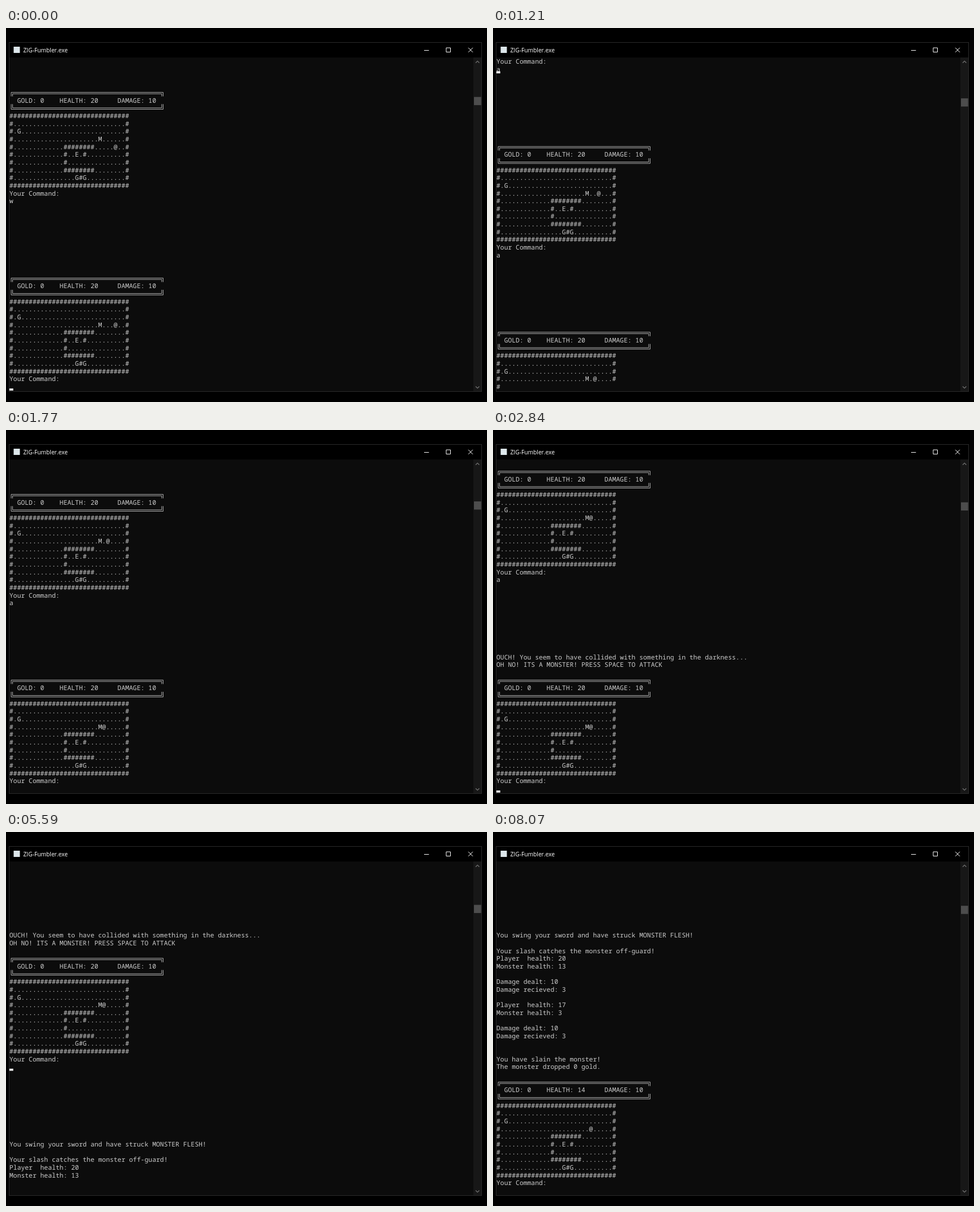
Animation of 849 by 660 pixels, one loop 8220 ms. Source, as an HTML page:

```html
<!DOCTYPE html>
<html lang="en">
<head>
<meta charset="utf-8">
<title>Dungeon console</title>
<style>
  html, body { margin: 0; width: 100%; height: 100%; overflow: hidden; background: #000; }
  svg { display: block; }
  .title { font: 10.24px "Open Sans", "Noto Sans", sans-serif; fill: #fff; }
  #rows text {
    font: 11.377px "Noto Sans Mono", "DejaVu Sans Mono", monospace;
    fill: #ccc; white-space: pre; text-rendering: geometricPrecision;
  }
  #rows path { fill: none; stroke: #c4c4c4; stroke-width: .9; }
  .icon { fill: none; stroke: #fff; }
  .arrow { fill: none; stroke: #707070; stroke-width: 1.3; }
</style>
</head>
<body>
<svg width="849" height="660" viewBox="0 0 849 660">
  <rect width="849" height="660" fill="#000"/>
  <rect x="5.5" y="25.5" width="834" height="616" fill="#000" stroke="#2b2b2b"/>
  <rect x="6" y="52" width="833" height="589" fill="#0c0c0c"/>
  <rect x="13.5" y="33" width="11" height="11" fill="#dce6ea"/>
  <text class="title" x="30.5" y="42.6">ZIG-Fumbler.exe</text>
  <path class="icon" d="M738 39.5h8.5M777 35h7.5v7.5h-7.5zM816 34.8l8 8M824 34.8l-8 8"/>
  <rect x="825" y="52" width="14" height="589" fill="#171717"/>
  <path class="arrow" d="M829 61.5l3.2-3.2 3.2 3.2M829 632.5l3.2 3.2 3.2-3.2"/>
  <rect id="thumb" x="826" width="12.6" height="14.4" fill="#4d4d4d"/>
  <g id="rows"></g>
  <rect id="cursor" x="6" width="6.8" height="3.7" fill="#f2f2f2"/>
</svg>
<script>
const LOOP = 8220, ROWS = 43, LEFT = 6, TOP = 52.4, PITCH = 13.653;
const NS = "http://www.w3.org/2000/svg";
const byId = id => document.getElementById(id);
const rowsEl = byId("rows"), thumb = byId("thumb"), cursor = byId("cursor");

const WALL = "#".repeat(31);
const BOX_TOP = "box-top", BOX_END = "box-end";

function map(px, py, monster) {
  const grid = Array.from({ length: 10 }, (_, y) =>
    [...(y % 9 ? "#" + ".".repeat(29) + "#" : WALL)]);
  const put = (x, y, s) => [...s].forEach((c, i) => grid[y][x + i] = c);
  put(2, 2, "G");
  if (monster) put(23, 3, "M");
  put(14, 4, "########");
  put(14, 5, "#..E.#");
  put(14, 6, "#");
  put(14, 7, "########");
  put(17, 8, "G#G");
  put(px, py, "@");
  return grid.map(r => r.join(""));
}

const blanks = n => Array(n).fill("");
const turn = (x, y, key, health = 20, monster = true) => [
  BOX_TOP, `  GOLD: 0    HEALTH: ${health}     DAMAGE: 10`, BOX_END,
  ...map(x, y, monster), "Your Command:", key, ...blanks(9)
];
const health = (p, m) => ["Player  health: " + p, "Monster health: " + m, ""];
const blow = ["Damage dealt: 10", "Damage recieved: 3", ""];

const log = [
  ...turn(27, 4, "w"), ...turn(27, 3, "a"), ...turn(26, 3, "a"),
  ...turn(25, 3, "a"), ...turn(24, 3, "a"),
  "OUCH! You seem to have collided with something in the darkness...",
  "OH NO! ITS A MONSTER! PRESS SPACE TO ATTACK", "",
  ...turn(24, 3, ""),
  "You swing your sword and have struck MONSTER FLESH!", "",
  "Your slash catches the monster off-guard!",
  ...health(20, 13), ...blow, ...health(17, 3), ...blow, "",
  "You have slain the monster!", "The monster dropped 0 gold.", "",
  ...turn(24, 3, "", 14, false)
];

// time, first log line, characters printed on the last row, row of a busy cursor
const VIEWS = [
  [0, -4, 0], [650, 13, 1, 1], [700, 20, 0], [1210, 37, 1, 1], [1260, 44, 0],
  [1730, 62, 1, 0], [1770, 68, 0], [2230, 95, 0],
  [5590, 111, 0, 26], [5630, 130, 1], [5660, 138, 0]
];
// the prompt cursor toggles at each time, starting visible
const BLINKS = [190, 2840, 3350, 3850, 4420, 4920, 5440, 6510, 7000, 7510, 8070];

function add(tag, attrs, text = "") {
  const el = document.createElementNS(NS, tag);
  for (const k in attrs) el.setAttribute(k, attrs[k]);
  el.textContent = text;
  rowsEl.append(el);
}

function addEdge(row, isTop) {
  const y = TOP + row * PITCH, end = isTop ? y + PITCH : y;
  const line = (x1, x2, h) => `M${x1} ${end}V${y + h}H${x2}V${end}`;
  const [outer, inner] = isTop ? [6.6, 9.1] : [9.1, 6.6];
  add("path", { d: line(9.1, 277.4, outer) + line(11.6, 274.9, inner) });
}

function drawView([, first, tail]) {
  rowsEl.replaceChildren();
  for (let r = 0; r < ROWS; r++) {
    let s = log[first + r] || "";
    if (r === ROWS - 1) s = s.slice(0, tail);
    if (s === BOX_TOP || s === BOX_END) addEdge(r, s === BOX_TOP);
    else if (s) add("text", { x: LEFT, y: TOP + 11 + r * PITCH }, s);
  }
  thumb.setAttribute("y", 121.7 + (first + 4) * 0.06);
}

let shown;
function frame() {
  const t = performance.now() % LOOP;
  const view = VIEWS.findLast(v => v[0] <= t);
  if (view !== shown) drawView(shown = view);
  const busy = view[3];
  const lit = BLINKS.filter(b => b <= t).length % 2 === 0;
  const row = busy ?? ROWS - 1;
  cursor.setAttribute("y", TOP + 10.3 + row * PITCH);
  cursor.setAttribute("visibility", busy !== undefined || lit ? "visible" : "hidden");
  requestAnimationFrame(frame);
}
frame();
</script>
</body>
</html>
```
